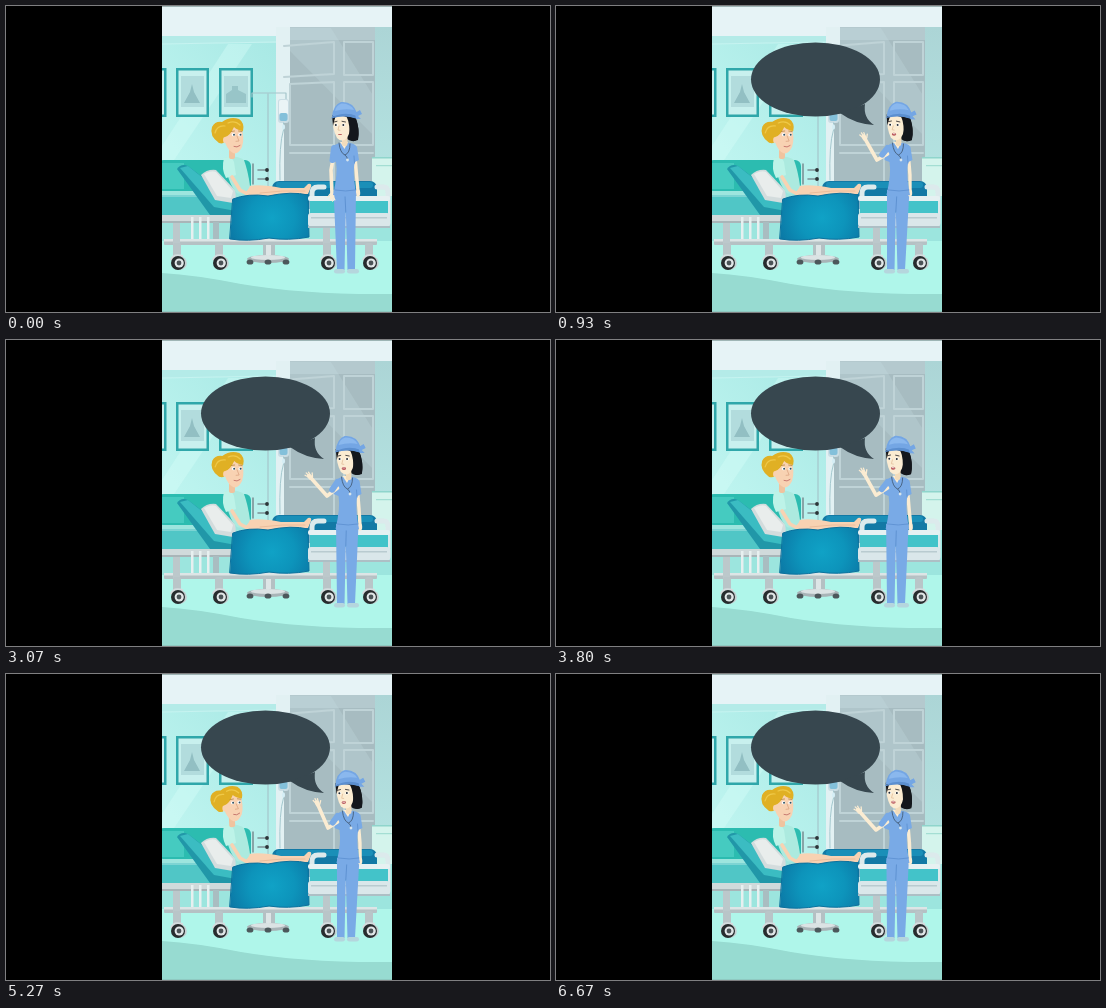
These frames come from a looping animation (544 px wide and 306 px high, 6.74 s). An HTML page with a canvas:

```html
<!DOCTYPE html>
<html lang="en">
<head>
<meta charset="utf-8">
<title>Hospital room</title>
<style>
html, body { margin: 0; width: 100%; height: 100%; overflow: hidden; background: #000; }
canvas { display: block; width: 544px; height: 306px; }
</style>
</head>
<body>
<canvas id="stage" width="544" height="306"></canvas>
<script>
const LOOP = 6740, STEP = 1000 / 15;
const stage = document.getElementById('stage');
const room = document.createElement('canvas');
room.width = 544;
room.height = 306;
let g = room.getContext('2d');

const SKIN = '#fbecd2', PINK = '#f8d2b2', SCRUB = '#79aae6', SHADE = '#5b8fd0';

function fill(color, d) {
  g.fillStyle = color;
  g.fill(new Path2D(d));
}
function line(color, width, d) {
  g.strokeStyle = color;
  g.lineWidth = width;
  g.lineCap = g.lineJoin = 'round';
  g.stroke(new Path2D(d));
}
function rect(color, x, y, w, h, r = 0) {
  g.fillStyle = color;
  g.beginPath();
  g.roundRect(x, y, w, h, r);
  g.fill();
}
function oval(color, x, y, rx, ry = rx, turn = 0) {
  g.fillStyle = color;
  g.beginPath();
  g.ellipse(x, y, rx, ry, turn, 0, Math.PI * 2);
  g.fill();
}
function stops(f, colors) {
  colors.forEach((c, i) => f.addColorStop(i / (colors.length - 1), c));
  return f;
}
const fade = (x0, y0, x1, y1, ...colors) => stops(g.createLinearGradient(x0, y0, x1, y1), colors);
const glow = (x, y, r, ...colors) => stops(g.createRadialGradient(x, y, 0, x, y, r), colors);

function clipRoom() {
  g.beginPath();
  g.rect(156, .5, 230, 305);
  g.clip();
}

function walls() {
  rect(fade(156, 150, 275, 50, '#bff5f0', '#a9e9e5'), 156, 0, 230, 306);
  rect('#e6f3f6', 156, 0, 230, 30);
  rect('#b4ebe8', 156, 30, 114, 7);
  line('#c6f3f0', 1.2, 'M156 38L270 36');
  fill('rgba(214,252,248,.4)', 'M156 140L222 38H246L156 172Z');
  rect('#9ce5de', 156, 182, 230, 53);
  rect('#aff6ea', 156, 235, 230, 71);
  fill('#97dbd1', 'M156 267Q190 269 235 278Q300 289 386 288V306H156Z');
}

function door() {
  rect('#e2f1f3', 270, 21, 116, 160);
  rect('#a7bcc1', 284, 21, 85, 160);
  rect('#b4c9ce', 284, 21, 85, 13);
  rect('#a7bcc1', 278, 108, 7, 73);
  fill('rgba(200,222,226,.25)', 'M284 22H325L368 91V130L284 45Z');
  line('#bfd3d7', 2, 'M278 40L328 36V68L278 71M338 36H367V69H338ZM284 78L328 76V139H284ZM338 76H367V139H338ZM284 147H328V181M338 181V147H367');
  rect(fade(0, 21, 0, 181, '#acd5d6', '#b4e4e2'), 369, 21, 17, 160);
  rect('#d4f4ec', 366, 152, 20, 38);
  rect('#8fd5cc', 366, 151, 20, 1.5);
  rect('#a4ded3', 370, 159, 16, 1.2);
}

function picture(x, w) {
  rect('#2fa7aa', x, 62, w, 49);
  rect('#c8f0ee', x + 2.5, 64.5, w - 5, 44);
  rect('#b2dcdd', x + 5, 70, w - 10, 31);
}

function pictures() {
  picture(149, 11.5);
  picture(170, 33);
  picture(213, 34);
  fill('#92bfc3', 'M178 97L184 86L186 78L188 86L194 97Z');
  fill('#98c5c8', 'M220 97V88L226 84V80H232V84L240 88V97Z');
}

function drip() {
  line('#a5c6cb', 1.2, 'M262 88V235M246 91V87H280V94');
  rect('#cadde4', 272, 93, 11, 24, 3);
  rect('#eaf4f6', 273, 94, 9, 15, 2);
  rect('#83c0da', 273.5, 107, 8, 8, 2);
  line('#9cc3ca', .9, 'M277.5 117V124Q273 138 274 174');
  oval('#d5eef5', 277.5, 121, 1.6, 2.8);
}

function wheel(x, y) {
  rect('#b9c5c8', x - 5, y - 20, 8, 15, 2);
  fill('#d5dddf', `M${x - 8} ${y - 3}Q${x - 6} ${y - 11} ${x + 5} ${y - 8}V${y}Z`);
  oval('#c5cfd1', x + 2, y, 6.8);
  oval('#272c2e', x, y, 7);
  oval('#e0e6e7', x + 1.2, y, 4.6);
  oval('#4b5457', x + 1, y, 2.4);
}

function bed() {
  rect('#2cbcb0', 152, 154, 93, 31, 6);
  rect('#45cbc0', 156, 157, 22, 26);
  rect('#50c6c6', 156, 189, 58, 20);
  line('#a8e4e1', 1.2, 'M156 190H198');
  line('#7d9297', 1.6, 'M247 158V178M252 164H261M252 173H261');
  oval('#2b3538', 261, 164, 1.9);
  oval('#2b3538', 261, 173, 1.9);
  fill('#2197a8', 'M171 163Q175 157 182 160L233 199V209H204Z');
  fill('#3bbcc2', 'M174 162L182 160L230 198V205L208 201Z');
  fill('#d3dcdd', 'M195 169Q201 163 210 164L229 184Q231 194 227 197L209 194Z');
  fill('#e9edec', 'M198 168Q205 164 210 166L227 185L225 192L211 190Z');
  rect('#1279a5', 266, 175, 105, 28, 7);
  rect('#1a8fb8', 270, 176, 97, 6, 3);
  rect('#d0dadb', 156, 209, 72, 6);
  rect('#a9b5b8', 156, 215, 72, 2);
  for (const x of [185, 193, 201]) rect('#e7f0f0', x, 211, 2.5, 23);
  rect('#a9bdc1', 207, 216, 6, 20);
  rect('#b5c1c4', 158, 233, 213, 6, 1);
  rect('#dde5e6', 158, 233, 213, 2.5);
  rect('#b4c0c3', 257, 239, 12, 12);
  rect('#dde5e6', 260, 239, 5, 12);
  oval('#a8b4b7', 262, 253, 21, 4);
  oval('#dbe3e4', 262, 251.5, 17, 2.4);
  for (const x of [244, 262, 280]) oval('#4c585b', x, 256, 3.4, 2.6);
  rect('#bcc8cb', 167, 217, 7, 32);
  rect('#bcc8cb', 317, 220, 7, 30);
  for (const x of [172, 214, 322, 364]) wheel(x, 257);
}

function footboard() {
  line('#dceaec', 5, 'M306 206V187Q306 181 312 181H318M371 181H378Q382 181 382 187V217');
  rect('#43c3c9', 304, 194, 78, 16);
  rect('#e6f1f2', 302, 190, 82, 5, 2);
  rect('#dae7ea', 302, 207, 82, 14, 3);
  rect('#b9cbd0', 305, 211, 76, 1.5);
  rect('#adbfc5', 302, 220, 82, 2);
}

function blanket() {
  const shape = 'M227 193Q242 187 262 190Q286 185 302 189L303 231Q282 235 263 232Q242 236 224 233Z';
  fill(glow(266, 212, 46, '#10a2c6', '#0d94bb', '#0b78a5'), shape);
  line('#0c719d', 1, shape);
}

function patientBody() {
  fill(PINK, 'M237 181Q252 177 275 182L298 182L302 178Q306 177 305 181L302 188Q274 190 256 193Q241 193 237 181Z');
  line('#e8b896', .8, 'M254 187Q276 184 299 185');
  fill('#aceadf', 'M218 152Q230 148 238 154Q242 165 244 180Q240 190 231 187Q222 179 218 152Z');
  fill('#bdf3e8', 'M218 152Q225 149 228 156L230 169L220 172Q215 163 218 152Z');
  line(PINK, 3.6, 'M226 171L234 184L247 191L252 192');
}

function patientHead(t) {
  const turn = t > 4550 && t < 5900 ? Math.sin((t - 4550) / 1350 * Math.PI) : 0;
  g.save();
  g.translate(228, 147);
  g.rotate(-.045 * turn + .012 * Math.sin(t / 430));
  g.translate(-228, -147);
  rect('#f0c39e', 223, 140, 6, 13, 2);
  fill(PINK, 'M217 124Q222 116 235 121Q239 131 236 141Q232 149 227 147Q218 142 217 124Z');
  fill('#e0b024', 'M213 137Q203 130 206 121Q209 115 216 116Q224 110 233 113Q239 117 237 125Q231 124 228 121Q224 130 219 131Q220 139 213 137Z');
  line('#efc948', 1.2, 'M209 127Q211 119 219 120M222 117Q229 114 234 119');
  oval(PINK, 219, 134, 2, 3);
  line('#b98a3b', .8, 'M225 125.5L228.5 125M232.5 125L236 125.5');
  const blink = (t + 500) % 2700 < 140;
  for (const x of [227.5, 234]) {
    if (blink) line('#715747', .8, `M${x - 1.5} 129H${x + 1.5}`);
    else {
      oval('#fff', x, 128.7, 1.8, 1.6);
      oval('#305263', x + .5, 128.7, 1);
    }
  }
  line('#dca684', .8, 'M231 130L233 135L230 135.3');
  line('#c2716a', .9, 'M228 140.5Q231 142 234 139.5');
  g.restore();
}

function bubble(t) {
  g.globalAlpha = Math.max(0, Math.min(1, (t - 60) / 280));
  oval('#37474f', 259.5, 73.5, 64.5, 37);
  fill('#37474f', 'M284 107Q299 118 318 119Q307 112 309 98Z');
  g.globalAlpha = 1;
}

// time, elbow x, elbow y, hand x, hand y
const POSES = [
  [0, 325, 164, 326, 188],
  [130, 325, 164, 326, 188],
  [480, 320, 154, 310, 130],
  [930, 321, 154, 309, 133],
  [1500, 321, 155, 304, 139],
  [2130, 320, 156, 308, 137],
  [2600, 321, 154, 311, 132],
  [3070, 321, 156, 305, 138],
  [3700, 320, 155, 309, 134],
  [4400, 320, 158, 301, 140],
  [4850, 321, 155, 306, 136],
  [5270, 322, 154, 312, 131],
  [5900, 321, 155, 308, 135],
  [6670, 320, 156, 304, 138],
  [LOOP, 320, 156, 303, 138]
];
const ease = u => u * u * (3 - 2 * u);

function pose(t) {
  const i = POSES.findIndex(p => p[0] > t);
  const a = POSES[i - 1], b = POSES[i];
  const u = ease((t - a[0]) / (b[0] - a[0]));
  return a.slice(1).map((v, k) => v + (b[k + 1] - v) * u);
}

function raisedArm(t, lift) {
  const [ex, ey, hx, hy] = pose(t);
  const sx = 328 + 3.5 * lift;
  line(SKIN, 3.6, `M${sx} 148L${ex} ${ey}L${hx} ${hy}`);
  line(SCRUB, 6, `M${sx} 142L${sx + (ex - sx) * .5} ${142 + (ey - 142) * .55}`);
  g.save();
  g.translate(hx, hy);
  g.rotate(Math.atan2(hy - ey, hx - ex) + Math.PI / 2);
  oval(SKIN, 0, -1.5, 2.3, 3.5);
  line(SKIN, 1.3, 'M-1.5 -3L-2.6 -6M0 -4L-.2 -7M1.5 -3L2 -6M2 0L4.2 -3');
  g.restore();
}

function nurseHead(t, lift) {
  g.save();
  g.translate(3.5 * lift + .5 * Math.sin(t / 360) * lift, 0);
  g.translate(341, 135);
  g.rotate(.03 * Math.sin(t / 510) * lift);
  g.translate(-341, -135);
  fill('#14171c', 'M331 109Q341 106 349 110Q354 122 352 133Q347 137 341 133Z');
  rect('#f2dcbb', 336, 130, 5.5, 10, 2);
  fill(SKIN, 'M327 111Q335 108 343 112Q346 124 341 132Q336 137 331 132Q326 123 327 111Z');
  fill('#14171c', 'M340 109Q348 108 350 113Q354 124 352 134Q345 137 343 132Q345 120 340 109Z');
  fill('#14171c', 'M326 109H330Q328 115 327 120Z');
  fill('#74a6e4', 'M326 111Q327 99 335 96Q347 95 351 107L349 112Q338 108 326 111Z');
  fill('#8ab8ee', 'M329 105Q330 99 336 97.5Q345 98 348 104Q339 102 329 105Z');
  fill(SHADE, 'M325.5 111.5Q338 105 351 110L350 112.5Q338 108.5 325.5 112.5Z');
  fill('#74a6e4', 'M349 107L354 104L356 108L352 110L355 113L350 113Z');
  line('#282629', .8, 'M328 116L331 115.3M336 115.3L339.5 116');
  const closed = t > 2060 && t < 2230 || t > 4610 && t < 4750;
  for (const x of [330, 337.5]) {
    if (closed) line('#49362e', .8, `M${x - 1.6} 119Q${x} 120 ${x + 1.6} 119`);
    else {
      oval('#fff', x, 119, 1.8, 1.4);
      oval('#242a30', x - .2, 119, 1);
    }
  }
  line('#e3bf9b', .8, 'M333 120L332 124L334 124.3');
  const talk = lift * Math.abs(Math.sin(t / 115));
  oval('#b9565a', 334, 128.4, 2.2, .5 + talk);
  if (talk > .7) rect('#fff', 332.7, 127.6, 2.6, .7);
  g.restore();
}

function nurse(t) {
  const lift = ease(Math.max(0, Math.min(1, (t - 100) / 380)));
  const sway = lift * (3 + .5 * Math.sin(t / 700));
  // feet stay planted while the torso moves
  fill(SCRUB, `M${327.5 + sway} 184H${350 + sway}L349 264H341.5L339.8 204L338.5 264H331Z`);
  line(SHADE, .9, `M${339 + sway * .5} 190L339.8 206`);
  rect('#b5d6dd', 328, 263, 11, 4.5, 2.2);
  rect('#b5d6dd', 341, 263, 12, 4.5, 2.2);

  const hand = 352 + lift * (2 + 4 * Math.exp(-(((t - 4400) / 450) ** 2)));
  line(SKIN, 3.4, `M${349 + sway} 151L${350.5 + sway} 169L${hand} 185`);
  oval(SKIN, hand, 187, 2.2, 3.8);
  if (lift < .5) raisedArm(t, lift);

  g.save();
  g.translate(sway, 0);
  fill(SCRUB, 'M327 140Q333 136 339 137Q347 136 351 141L353 154L349 156Q346 166 350.5 189Q339 192 327 189Q332 168 330 156L325 154Z');
  line(SHADE, .8, 'M348 150L348.5 157M329 184Q340 186 349.5 184');
  fill(SKIN, 'M334 136H342L338.5 143Z');
  line('#4a6584', 1, 'M333 137Q334 147 339 149Q344 147 344 138M339 149Q341.5 151 341.5 153');
  oval('#d7e5ec', 341.5, 154, 1.4);
  g.restore();

  if (lift >= .5) raisedArm(t, lift);
  nurseHead(t, lift);
}

function scene(t) {
  g.clearRect(0, 0, 544, 306);
  g.save();
  g.drawImage(room, 0, 0);
  clipRoom();
  patientHead(t);
  bubble(t);
  nurse(t);
  g.restore();
}

clipRoom();
for (const part of [walls, door, pictures, drip, bed, patientBody, blanket, footboard]) part();
g = stage.getContext('2d');

const start = performance.now();
function tick() {
  const t = (performance.now() - start) % LOOP;
  scene(Math.floor(t / STEP) * STEP);
  requestAnimationFrame(tick);
}
tick();
</script>
</body>
</html>
```
